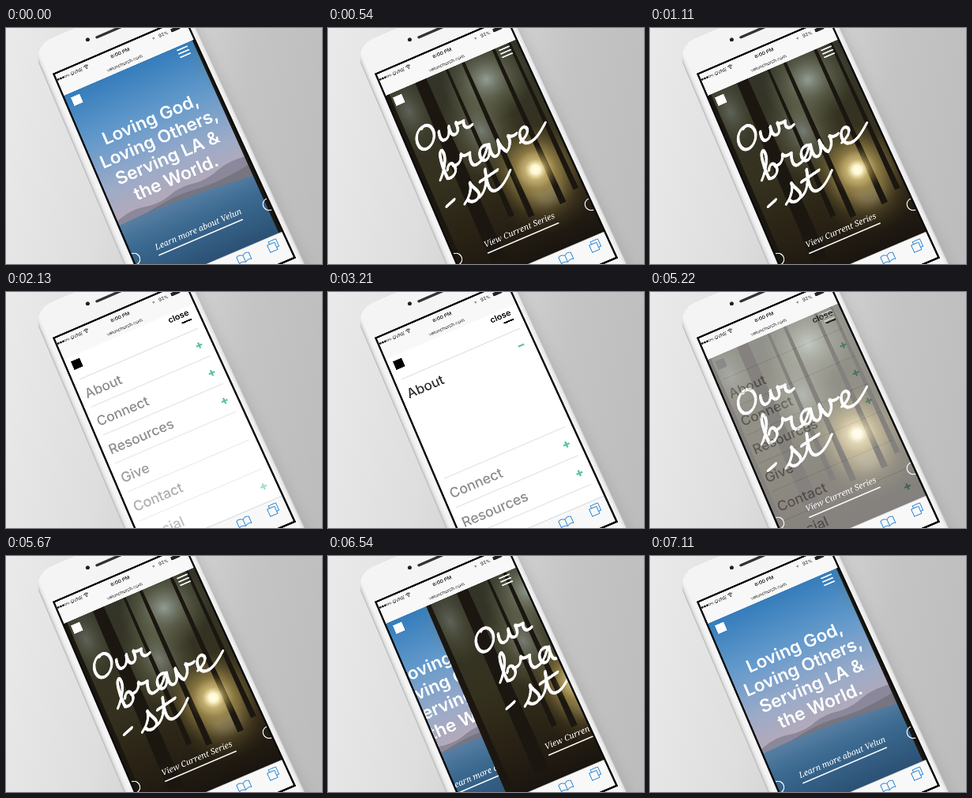
Recreate the animation shown at these times as an HTML page. Size 400 by 300 pixels, loop 7.23 s.

```html
<!DOCTYPE html>
<html lang="en">
<head>
<meta charset="utf-8">
<title>Phone site demo</title>
<style>
html, body { margin: 0; width: 100%; height: 100%; overflow: hidden; }
body { position: relative; background: linear-gradient(100deg, #eaeaea, #dedede 35%, #c4c4c4 70%, #bcbcbc); }
/* Unit coordinates: the page area is 179 wide, its origin near the top left */
#phone {
  position: absolute; left: 0; top: 0; width: 448px; height: 880px; overflow: visible;
  transform-origin: 0 0; will-change: transform;
  transform: matrix3d(.91274,-.39675,0,-.0000148, .36473,.87004,0,-.0001414, 0,0,1,0, 70,78,0,1)
    translate(-20px, -100px) scale(.5);
}
text { font-family: Inter, "Open Sans", sans-serif; }
.title { font-size: 22.3px; font-weight: 600; text-anchor: middle; fill: #fff; }
.link { font: italic 10.2px "Noto Serif", serif; text-anchor: middle; fill: #fff; }
.bar { font-size: 6px; fill: #222; }
.line { fill: none; stroke: #fff; stroke-width: 1.6; }
.brush { fill: none; stroke: #fff; stroke-width: 2.8; stroke-linecap: round; stroke-linejoin: round; }
.icon { fill: none; stroke: #3f8fd6; stroke-width: 1; stroke-linejoin: round; }
.item { font-size: 17.2px; font-weight: 500; fill: #8c8c8c; }
.plus { stroke: #5cc2a5; stroke-width: 2.2; }
</style>
</head>
<body>
<svg id="phone" viewBox="-20 -100 224 440">
  <defs>
    <linearGradient id="case">
      <stop offset="0" stop-color="#b5b5b5"/><stop offset=".012" stop-color="#e2e2e2"/>
      <stop offset=".03" stop-color="#f4f4f4"/><stop offset=".97" stop-color="#f5f5f5"/>
      <stop offset=".99" stop-color="#e6e6e6"/><stop offset="1" stop-color="#b0b0b0"/>
    </linearGradient>
    <linearGradient id="sky" x2="0" y2="1">
      <stop offset="0" stop-color="#2f79b9"/><stop offset=".4" stop-color="#6299cb"/>
      <stop offset=".75" stop-color="#9cabc8"/><stop offset="1" stop-color="#b9a9b6"/>
    </linearGradient>
    <linearGradient id="sea" x2="0" y2="1">
      <stop offset="0" stop-color="#587f a3"/><stop offset="0" stop-color="#587fa3"/>
      <stop offset=".35" stop-color="#3c6a91"/><stop offset="1" stop-color="#2a5073"/>
    </linearGradient>
    <linearGradient id="wood" x2="0" y2="1">
      <stop offset="0" stop-color="#33352a"/><stop offset=".5" stop-color="#35311f"/>
      <stop offset=".78" stop-color="#282114"/><stop offset="1" stop-color="#19140f"/>
    </linearGradient>
    <radialGradient id="gap">
      <stop offset="0" stop-color="#aab7b0" stop-opacity=".8"/>
      <stop offset=".5" stop-color="#7d8268" stop-opacity=".45"/>
      <stop offset="1" stop-color="#6c7050" stop-opacity="0"/>
    </radialGradient>
    <radialGradient id="sun">
      <stop offset="0" stop-color="#fffff4"/><stop offset=".18" stop-color="#fff6cb"/>
      <stop offset=".42" stop-color="#b39c56" stop-opacity=".75"/>
      <stop offset="1" stop-color="#5b4c22" stop-opacity="0"/>
    </radialGradient>
    <filter id="soft" x="-30%" width="160%"><feGaussianBlur stdDeviation="7"/></filter>
    <clipPath id="page"><rect y="9" width="179" height="269"/></clipPath>
  </defs>

  <rect x="0" y="-50" width="190" height="460" rx="30" fill="#777" opacity=".25" filter="url(#soft)"/>
  <rect x="-13.5" y="-68" width="202" height="480" rx="27" fill="url(#case)"/>
  <circle cx="56" cy="-47" r="2.6" fill="#222"/>
  <path d="M68 -45H111" stroke="#333" stroke-width="3.4" stroke-linecap="round"/>
  <rect x="-2.4" y="-24" width="183.8" height="337.5" fill="#0c0c0c"/>
  <rect y="-21.5" width="179" height="332.5" fill="#f8f8f8"/>

  <g class="bar" transform="translate(-2.5 3)">
    <g id="signal"></g>
    <text x="21" y="-14.6">QVNE</text>
    <path d="M40 -18.4Q43 -21 46 -18.4M41.3 -16.9Q43 -18.4 44.7 -16.9" fill="none" stroke="#222"/>
    <circle cx="43" cy="-15.3" r=".8"/>
    <text x="89.5" y="-14.4" text-anchor="middle" font-size="6.3" font-weight="600">6:00 PM</text>
    <circle cx="136" cy="-16.8" r="1.4" fill="#999"/>
    <text x="143" y="-14.6">92%</text>
    <rect x="160" y="-19" width="12" height="4.6" rx="1"/>
    <text x="89.5" y=".4" text-anchor="middle">velunchurch.com</text>
  </g>

  <g clip-path="url(#page)">
    <g id="coast">
      <rect width="179" height="192" fill="url(#sky)"/>
      <path d="M0 185Q20 178 38 182T72 181T104 179T138 176T179 174V202H0Z" fill="#8b889c"/>
      <path d="M40 190Q75 183 105 187T179 184V202H40Z" fill="#77757f"/>
      <path d="M0 191Q90 188 179 200V280H0Z" fill="url(#sea)"/>
      <g id="title"></g>
      <text class="link" x="87" y="237.500">Learn more about Velun</text>
      <path class="line" d="M30 244.500H142"/>
    </g>
    <g id="forest">
      <rect width="179" height="280" fill="url(#wood)"/>
      <ellipse cx="124" cy="42" rx="58" ry="56" fill="url(#gap)"/>
      <ellipse cx="92" cy="100" rx="46" ry="66" fill="url(#gap)" opacity=".7"/>
      <ellipse cx="18" cy="40" rx="34" ry="60" fill="url(#gap)" opacity=".45"/>
      <ellipse cx="135" cy="205" rx="60" ry="52" fill="url(#sun)" opacity=".35"/>
      <circle cx="134" cy="173" r="58" fill="url(#sun)"/>
      <g id="trunks" fill="#1b1710"></g>
      <circle cx="134" cy="173" r="32" fill="url(#sun)"/>
      <g id="words">
        <g id="script"></g>
        <text class="link" x="85" y="238">View Current Series</text>
        <path class="line" d="M38 245.500H133"/>
      </g>
    </g>
    <g id="arrows" class="line" style="stroke-width:1.100"><circle cy="237" r="7.500"/><circle cx="179" cy="240" r="7.500"/></g>
    <path id="burger" class="line" style="stroke-width:1.800" d="M154 13.500h14.500m-14.500 5h14.500m-14.500 5h14.500"/>
    <g id="menu">
      <rect width="179" height="280" fill="#fff"/>
      <text x="168.500" y="20" font-size="10.600" font-weight="600" text-anchor="end">close</text>
      <path d="M155 26.500h13.500" stroke="#000" stroke-width="2"/>
      <g id="rows"></g>
    </g>
    <rect id="mark" x="7" y="15" width="12" height="12"/>
  </g>

  <rect y="277.500" width="179" height="33.500" fill="#f8f8f8"/>
  <path d="M0 277.500H179" stroke="#cfcfcf" stroke-width=".7"/>
  <path class="icon" d="M124 285.500Q120 282 116 284.500V293Q120 291 124 294Q128 291 132 293V284.500Q128 282 124 285.500V294"/>
  <path class="icon" d="M156 285.500h9.500v9.500h-9.500zM159 285.500v-3.200h9.700v9.700h-3.200"/>
</svg>
<script>
const LOOP = 7230, WIDTH = 179, PITCH = 39.2, EXPAND = 100;
const $ = id => document.getElementById(id);
const clamp = x => Math.min(1, Math.max(0, x));
const ramp = (t, from, to) => clamp((t - from) / (to - from));
const out = (t, from, to) => 1 - (1 - ramp(t, from, to)) ** 4;
const shift = (el, x, y = 0) => el.setAttribute('transform', `translate(${x} ${y})`);
const grey = v => `rgb(${v},${v},${v})`;

$('signal').innerHTML = [0, 1, 2, 3, 4].map(i =>
  `<circle cx="${4 + i * 3.4}" cy="-16.7" r="1.25" stroke="#222" stroke-width=".4" fill="${i < 3 ? '#222' : 'none'}"/>`).join('');

$('title').innerHTML = ['Loving God,', 'Loving Others,', 'Serving LA &amp;', 'the World.'].map((s, i) =>
  `<text class="title" x="88" y="${90 + i * 27}">${s}</text>`).join('');

// x, width and height of each tree
$('trunks').innerHTML = [[-2, 6, 280], [40, 15, 260], [82, 3, 215], [104, 4, 225], [146, 4, 225], [168, 3, 215]]
  .map(([x, w, h]) => `<path d="M${x} 0h${w}L${x + w + 2} ${h}h${-w - 4}z"/>`).join('');

// Lettering: "Our brave -st"
const strokes = [
  'M28 66C14 66 8 84 14 92C22 100 38 86 36 74C35 66 28 64 24 68',
  'M42 80C40 88 40 94 46 93C52 92 55 84 56 79C55 86 54 92 60 92C66 91 66 83 66 78C68 82 74 80 76 80C73 86 74 93 84 89',
  'M20 138C30 128 40 112 36 104C31 102 28 124 29 140C36 143 46 136 42 126C40 122 35 125 33 130',
  'M42 128C48 130 54 126 56 118C58 124 64 121 67 121C63 130 62 140 70 138C80 136 84 130 92 121C82 116 74 128 78 136C84 142 92 130 93 121C91 130 90 140 97 138C103 136 104 126 105 120C105 128 107 136 110 138C117 134 120 126 119 120C122 124 127 123 130 122',
  'M130 134C142 130 148 122 142 118C134 116 128 132 136 138C146 142 158 132 168 124',
  'M14 172L26 168',
  'M36 178C46 172 52 162 52 156C52 164 62 172 54 178C48 182 42 178 42 176M54 178C66 176 74 160 76 148C72 162 68 178 78 178C86 178 96 170 104 162M64 160L90 155',
].join('');
$('script').innerHTML = [0, 1].map(i =>
  `<path class="brush" d="${strokes}" transform="translate(${i * 1.2} ${-i * 1.1})"/>`).join('');

const plus = '<path class="plus" d="M159.5 62h8"/><path class="plus up" d="M163.5 58v8"/>';
$('rows').innerHTML = ['About', 'Connect', 'Resources', 'Give', 'Contact', 'Social'].map((s, i) =>
  `<g><path d="M8 41H171" stroke="#dcdcdc" stroke-width=".9"/>
   <text class="item" x="7.5" y="68">${s}</text>${i === 3 || i === 4 ? '' : plus}</g>`).join('');
const rows = [...$('rows').children];
const about = rows[0].querySelector('text'), upright = rows[0].querySelector('.up');

function draw(t) {
  const swipe = out(t, 30, 690) - out(t, 6480, 7140);
  shift($('coast'), -.3 * WIDTH * swipe);
  shift($('forest'), WIDTH * (1 - swipe));
  shift($('words'), .42 * WIDTH * (1 - swipe));
  $('arrows').setAttribute('opacity', clamp(Math.abs(2 * swipe - 1) * 5 - 4));

  const menu = ramp(t, 1380, 1680) - ramp(t, 5010, 5400);
  $('menu').setAttribute('opacity', menu);
  $('burger').setAttribute('opacity', 1 - menu);
  $('mark').setAttribute('fill', grey(255 * (1 - menu)));

  const open = out(t, 2670, 3390) - out(t, 3960, 4770);
  rows.forEach((row, i) => {
    shift(row, 0, i * PITCH + (i ? open * EXPAND : 0));
    row.setAttribute('opacity', ramp(t, 1500 + i * 70, 2000 + i * 70));
  });
  const active = ramp(t, 2670, 2900) - ramp(t, 4400, 4680);
  about.style.fill = grey(140 - 92 * active);
  upright.setAttribute('opacity', 1 - ramp(t, 2670, 2900) + ramp(t, 3960, 4200));
}

const start = performance.now();
(function tick() {
  draw((performance.now() - start) % LOOP);
  requestAnimationFrame(tick);
})();
</script>
</body>
</html>
```
